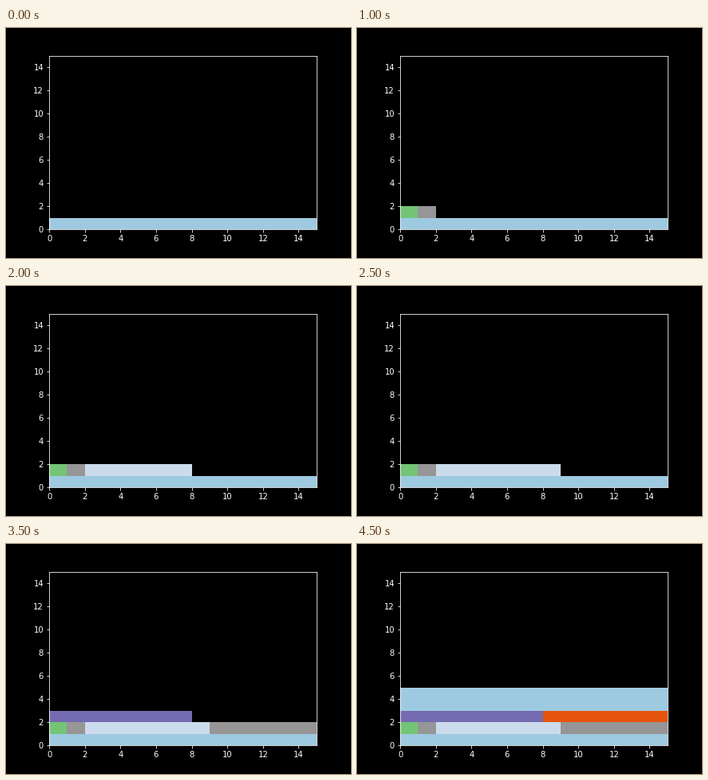
Animation of 432x288 px, one loop 5 s. Source, as a matplotlib script:

```python
import matplotlib.pyplot as plt
from matplotlib.animation import FuncAnimation
from matplotlib.patches import Rectangle

SIZE = 15
STEP_MS = 500

BLUE, GREEN, GREY = "#9ecae1", "#74c476", "#969696"
PALE, LILAC = "#c6dbef", "#ccdbec"
PURPLE, ORANGE = "#756bb1", "#e6550d"

# x, y, width, height, colour: one block is placed per step
BLOCKS = [
    (0, 0, 15, 1, BLUE),
    (0, 1, 1, 1, GREEN),
    (1, 1, 1, 1, GREY),
    (2, 1, 4, 1, PALE),
    (6, 1, 2, 1, LILAC),
    (8, 1, 1, 1, LILAC),
    (9, 1, 6, 1, GREY),
    (0, 2, 8, 1, PURPLE),
    (8, 2, 7, 1, ORANGE),
    (0, 3, 15, 2, BLUE),
]
PALE_STEP = 3

plt.style.use("dark_background")
plt.rcParams["font.family"] = "DejaVu Sans"
fig, ax = plt.subplots(figsize=(6, 4), dpi=72)
fig.subplots_adjust(left=0.125, right=0.9, bottom=0.125, top=0.88)
ax.set_xlim(0, SIZE)
ax.set_ylim(0, SIZE)

patches = [
    ax.add_patch(Rectangle((x, y), w, h, facecolor=color,
                           edgecolor="none", linewidth=0, visible=False))
    for x, y, w, h, color in BLOCKS
]


def update(step):
    for i, patch in enumerate(patches):
        patch.set_visible(i <= step)
    # the pale block takes the tint of its neighbours once they arrive
    patches[PALE_STEP].set_facecolor(LILAC if step > PALE_STEP else PALE)
    return patches


anim = FuncAnimation(fig, update, frames=len(BLOCKS), interval=STEP_MS,
                     init_func=lambda: update(0), repeat=True,
                     repeat_delay=0, blit=False)
plt.show()
```
